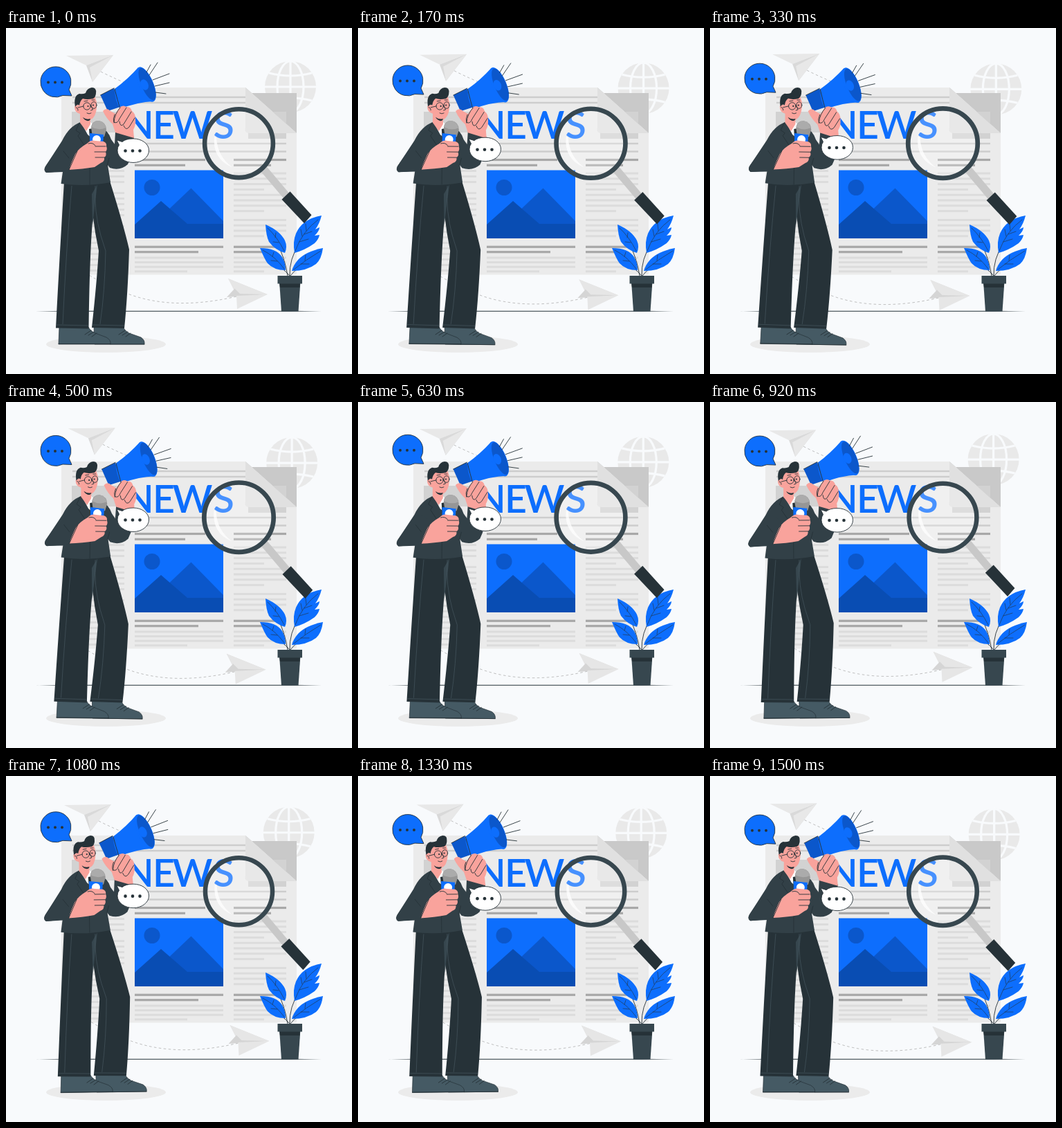
Animation, 500 px wide and 500 px high, one loop 1.54 s. Source, as an HTML page:

```html
<!DOCTYPE html>
<html lang="en">
<head>
<meta charset="utf-8">
<title>News reporter</title>
<style>
html, body { margin: 0; width: 100%; height: 100%; overflow: hidden; background: #f8fafc; }
svg { display: block; width: 100vw; height: 100vh; }
.ink { fill: none; stroke: #263238; stroke-width: .9; stroke-linecap: round; stroke-linejoin: round; }
.skin { fill: #f9a39c; }
.suit { fill: #324047; }
.slate { fill: #37474f; }
.dark { fill: #263238; }
.blue { fill: #0d6efd; }
.deep { fill: #0b57cb; }
.shoe { fill: #455a64; stroke: #263238; stroke-width: .7; }
.trail { fill: none; stroke: #b5b5b5; stroke-width: .9; stroke-dasharray: 3.5 3.5; }
.crease { fill: none; stroke: #46565f; stroke-width: .7; }
</style>
</head>
<body>
<svg viewBox="0 0 500 500">
  <ellipse cx="144.500" cy="457" rx="86.500" ry="12" fill="#ebebeb"/>

  <g id="globe">
    <circle cx="411" cy="85" r="37" fill="#e9e9e9"/>
    <g fill="none" stroke="#f8fafc" stroke-width="3.200">
      <path d="M411 47V123M373 85H449M380 65Q411 73 442 65M380 105Q411 97 442 105"/>
      <ellipse cx="411" cy="85" rx="19" ry="37"/>
    </g>
  </g>

  <!-- newspaper -->
  <path d="M80 86H346L420 152V356.500H80Z" fill="#ebebeb"/>
  <path d="M352 94H420V152L346 86Z" fill="#c9c9c9"/>
  <g id="lines"></g>
  <path d="M95 121H172V151H95ZM350 121H405V160H350Z" fill="#d2d2d2"/>
  <path d="M346 86L420 152H352Q344 152 346 144Z" fill="#e0e0e0"/>
  <text class="blue" x="171 212 240.500 299.500" y="160" font-family="Lato, 'Open Sans', sans-serif" font-weight="600" font-size="55.500">NEWS</text>
  <path class="blue" d="M186 205.400H314V304H186Z"/>
  <circle class="deep" cx="211" cy="230.500" r="11.500"/>
  <path class="deep" d="M228 269L267.500 231.500L314 279V304H228Z"/>
  <path fill="#094db3" d="M186 284L224 250L262 283H314V304H186Z"/>

  <g id="planeTop">
    <path class="trail" d="M131 60Q150 70 174 80"/>
    <path d="M87 40L155 39L116 54Z" fill="#e8e8e8"/>
    <path d="M116 54L155 39L125 78Z" fill="#d9d9d9"/>
    <path d="M155 39L125 78L121 57Z" fill="#e8e8e8"/>
  </g>
  <g id="planeLow">
    <path class="trail" d="M333 388Q225 413 152 373Q134 366 120 357"/>
    <path d="M321 362L378 385L329 378Z" fill="#e5e5e5"/>
    <path d="M331 376L378 385L319 389Z" fill="#d5d5d5"/>
    <path d="M329 375L321 362L378 385L338 384ZM378 385L334 406L333 387Z" fill="#e6e6e6"/>
  </g>

  <path class="dark" d="M43 409.300L90 408.800H410L456 409.300L410 409.800H90Z"/>

  <!-- plant -->
  <path class="ink" d="M410 358Q409 334 424 311M407 358Q403 332 391 309M410 358Q399 346 386 338M411 358Q421 345 438 338"/>
  <g class="blue">
    <path d="M456 271Q428 276 419 297Q414 309 417 325Q432 321 446 311Q452 305 453 299L446 300Q453 293 453 288L447 291Q453 283 456 271Z"/>
    <path d="M375 284Q396 293 403 307Q407 316 403 325Q389 321 380 309Q376 301 375 284Z"/>
    <path d="M367 318Q391 318 399 331Q404 339 404 350Q387 350 378 340Q374 335 367 318Z"/>
    <path d="M458 318Q433 323 422 335Q415 343 413 351Q435 351 448 341Q456 334 458 318Z"/>
  </g>
  <path class="ink" style="stroke-width:.6" d="M451 277Q428 294 418 322M428 301L426 291M434 293L433 283M424 309L437 305M431 298L442 294M378 289Q392 302 402 322M389 303L390 296M394 310L386 309M371 321Q389 330 402 348M385 330L387 324M392 337L383 336M455 322Q433 335 416 349M432 336L433 328M426 341L438 341"/>
  <path class="slate" d="M395 366H425.500L422.500 409.500H398Z"/>
  <path class="dark" d="M395 368H425L424.500 375H396Z"/>
  <path class="slate" d="M392.500 358H428V369.500H392.500Z"/>

  <g id="lens">
    <path d="M372 203L405 242" stroke="#c8c8c8" stroke-width="11"/>
    <path class="dark" d="M398.500 247.500L410.500 236L441.500 270L431 282Z"/>
    <circle cx="336.500" cy="166.500" r="49" fill="#fff" fill-opacity=".24"/>
    <path d="M301 157Q298 189 327 201Q305 185 304 157Z" fill="#fff" opacity=".75"/>
    <circle cx="336.500" cy="166.500" r="49.400" fill="none" stroke="#37474f" stroke-width="6.600"/>
  </g>

  <g id="man">
    <!-- shoes -->
    <path class="shoe" d="M127 432L169 432Q172 438 178 441L195 447Q201 451 200 457H128Z"/>
    <path class="shoe" d="M77 432H119Q122 438 129 441L145 447Q152 451 151 457H76Z"/>
    <path class="ink" d="M76 456.500H151M151 457H200M114 443L123 437M119 444L127 439M124 446L131 441M163 443L172 437M168 444L176 439M173 446L180 441"/>

    <!-- trousers -->
    <path class="dark" d="M122 220L150 221Q170 285 178 320Q176 385 171 434L124 433Q131 370 134 322Q123 270 122 220Z"/>
    <path class="dark" d="M84 222H132L127 258Q121 310 119.500 434.500L72 433.500Q78 320 84 222Z"/>
    <path class="slate" d="M124 240L132 226L127 268L125 286Z"/>
    <path class="crease" d="M95 228Q87 320 82 428M129 228Q127 265 137 300L144 322Q143 380 136 428M73 429L119 430M125 429L171 430"/>

    <!-- raised arm -->
    <path class="suit" d="M136 143Q148 148 152 161L157 168L158 150L185 157Q184 181 176 197Q165 207 150 202L138 186Z"/>

    <!-- torso -->
    <path class="suit" d="M108 136Q91 142 81 163L59 197Q53 205 58 209L82 208L79.500 225Q115 230 151 223L147 198Q151 169 142 150L126 139Z"/>
    <path d="M107 134L122 136L129 143L126 161L118 154Z" fill="#fff"/>
    <path class="dark" d="M120 146L125 145L127 150L126 174L121 162Z"/>
    <path class="ink" d="M106 137L101 148L107 152L104 156L121 181L121 226M93 171L85 184M146 199L149 188"/>

    <!-- head -->
    <path class="skin" d="M107 122L122 126V139L116 149L107 137Z"/>
    <path class="skin" d="M105 101L127 97Q132 105 131 115Q130 129 122 133Q112 134 107 124Q99 122 99 114Q101 108 106 112Z"/>
    <path class="dark" d="M100 114Q97 98 106 95Q111 96 115 94Q117 87 124 86Q131 86 130 94Q130 99 126 102Q117 104 111 102Q107 105 106 112Q103 109 100 114Z"/>
    <path class="dark" d="M111 129Q116 133 122 131Q121 135 117 134Q113 133 111 129Z"/>
    <circle class="ink" cx="117" cy="113" r="5.200"/>
    <ellipse class="ink" cx="127" cy="111.500" rx="4" ry="4.800"/>
    <path class="ink" d="M112 113L104 115M122 112L123 112M123 113L125.500 118L122.500 119M117 123Q120 125 123 123M113 106L118 105M124 104L128 104M101 115Q104 115 104 119"/>
    <circle class="dark" cx="118.500" cy="113" r="1.100"/>
    <circle class="dark" cx="126" cy="111.500" r="1.100"/>

    <!-- microphone -->
    <path class="dark" d="M126 158H138L134 180H126Z"/>
    <path d="M123 144Q124 134 134 134Q145 136 145 147L142 157H125Z" fill="#969696"/>
    <path d="M123 143Q126 134 134 134Q142 135 144.500 144Q134 149 123 143Z" fill="#ababab"/>
    <path class="blue" d="M121 152L141 154L140 170L121 167Z"/>
    <circle cx="131" cy="161" r="6" fill="#fff"/>
    <path class="skin" d="M90 205L100 182Q106 173 117 167Q123 161 129 163L141 164Q146 166 145 171Q147 175 144 179Q146 184 142 187Q143 193 137 195L128 201Q111 204 90 205Z"/>
    <path class="ink" d="M129 171L144 171M128 179L144 179M129 187L142 187M119 167Q126 165 129 170"/>
    <path class="suit" d="M82 164Q101 163 103 176Q94 192 91 206L59 209Q52 206 59 197Z"/>
    <path class="ink" d="M91 205L103 178M83 178L91 188"/>

    <!-- megaphone -->
    <path class="deep" d="M136.500 97L156 87L165 114L147 120Z"/>
    <path class="blue" d="M157 88Q176 74 191 57L214 106Q189 107 165 117Q157 105 157 88Z"/>
    <ellipse class="blue" cx="202.500" cy="81.500" rx="10.500" ry="27" transform="rotate(-23 202.500 81.500)"/>
    <ellipse class="deep" cx="204" cy="81" rx="8.500" ry="25" transform="rotate(-23 204 81)"/>
    <ellipse class="blue" cx="200" cy="82" rx="5.500" ry="8" transform="rotate(-23 200 82)"/>
    <path class="ink" d="M136.500 97L156 87M157 88Q161 104 165 117M203 64L209 53M207 68L219 50M212 75L236 66M215 84L236 79M216 93L231 95"/>

    <!-- fist -->
    <path class="skin" d="M140 120Q145 114 151 120L158 124L165 114Q170 111 174 114Q180 113 182 120Q187 123 187 132Q188 140 184 147L185 159L158 151L154 139Q145 131 140 120Z"/>
    <path class="ink" d="M157 125Q154 132 156 137M165 115Q157 124 156 136Q161 139 164 131L174 115M164 135Q165 144 170 139L181 121M170 141Q173 149 178 143L186 130"/>
  </g>

  <g id="blueTalk">
    <path class="blue" stroke="#263238" stroke-width=".9" d="M86.500 61.500A22 22 0 1 0 82 97.500L95 98L91 89A22 22 0 0 0 86.500 61.500Z"/>
    <g class="dark"><circle cx="61" cy="78.500" r="2"/><circle cx="71" cy="78.500" r="2"/><circle cx="81" cy="78.500" r="2"/></g>
  </g>
  <g id="whiteTalk">
    <path fill="#fff" stroke="#263238" stroke-width=".9" d="M160 162L168 164.500Q173 160 184 160C196 160 206.500 167 206.500 177S196 194.500 184 194.500S161 187 161 177Q161 172 163.500 169Z"/>
    <g class="dark"><circle cx="172.500" cy="177.500" r="2.300"/><circle cx="183" cy="177.500" r="2.300"/><circle cx="193.500" cy="177.500" r="2.300"/></g>
  </g>
</svg>
<script>
const LOOP = 1540;
const $ = id => document.getElementById(id);

// newspaper text rules
let rules = "";
const rule = (x, end, y, color = "#dcdcdc", h = 3) =>
  rules += `<rect x="${x}" y="${y - h / 2}" width="${end - x}" height="${h}" fill="${color}"/>`;
const bold = (x, end, y) => rule(x, end, y, "#a8a8a8", 3.2);
const thin = (end, y) => rule(96, end, y, "#cdcdcd", 2.5);

thin(346, 100);
thin(352, 108);
thin(405, 167);
thin(405, 178.5);
for (const [x, end, short] of [[186, 288, 259], [329, 405, 383]]) {
  bold(x, end, 190.5);
  bold(x, short, 198.3);
}
for (const [x, end, short] of [[186, 314, 278], [329, 405, 373]]) {
  bold(x, end, 316.3);
  bold(x, short, 323.7);
}
for (let i = 0; i < 12; i++) {
  const y = 210 + i * 7.8 + (i > 7 ? 5 : 0);
  rule(329, i % 4 === 3 ? 373 : 405, y);
}
for (let i = 0; i < 21; i++) rule(96, i % 6 === 5 ? 140 : 171, 190.5 + i * 8);
for (let i = 0; i < 4; i++) {
  const y = 332 + i * 6.6;
  rule(186, i === 3 ? 262 : 314, y);
  rule(329, i === 3 ? 373 : 405, y);
}
$("lines").innerHTML = rules;

const put = (id, value) => $(id).setAttribute("transform", value);
const move = (id, x, y) => put(id, `translate(${x} ${y})`);

function draw(ms) {
  const a = 2 * Math.PI * ms / LOOP;
  const s = Math.sin(a);
  const lift = Math.cos(a + .33) - .95;
  move("globe", 2.4 * s, 3.4 * s);
  move("planeTop", 3.2 * s, -2 * s);
  move("planeLow", -2.6 * s, 2 * s);
  put("man", `rotate(${.85 * s} 125 235)`);
  put("lens", `translate(336.5 166.7) scale(${1 + .018 * s}) translate(-336.5 -166.5)`);
  move("blueTalk", 0, 4.5 * lift);
  move("whiteTalk", 0, 4.2 * lift);
}

function tick() {
  draw(performance.now() % LOOP);
  requestAnimationFrame(tick);
}
tick();
</script>
</body>
</html>
```
